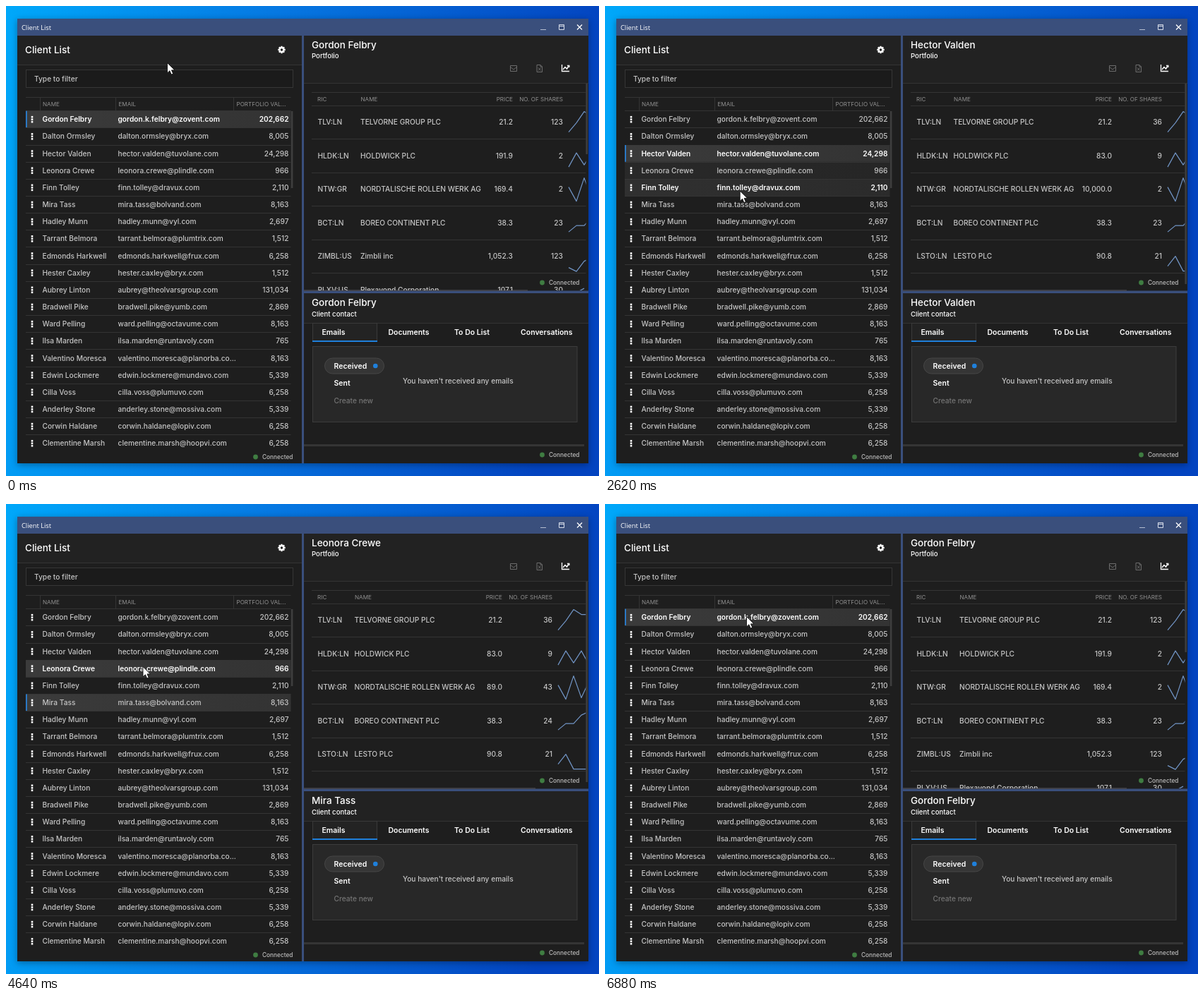
These frames come from a looping animation (840 px wide and 666 px high, 8.33 s). An HTML page:

```html
<!DOCTYPE html>
<html lang="en">
<head>
<meta charset="utf-8">
<title>Client List</title>
<style>
  html, body { margin: 0; width: 100%; height: 100%; overflow: hidden; background: #0a6ad8; }
  svg { display: block; width: 840px; height: 666px; }
  text { font-family: Inter, "Open Sans", sans-serif; font-size: 10.2px; font-weight: 500; fill: #c6c6c6; white-space: pre; }
  .th { font-size: 8.1px; font-weight: 400; fill: #909090; }
  .h1 { font-size: 13.5px; fill: #fff; }
  .h2 { font-size: 9.6px; fill: #fff; }
  .tab { font-size: 10.5px; font-weight: 600; fill: #fff; }
  .small { font-size: 8.3px; fill: #bdbdbd; }
  .caption { font: 9.3px "Open Sans", sans-serif; fill: #fff; }
  .on text { font-weight: 600; fill: #fff; }
  .line { stroke: #343434; stroke-width: 1; fill: none; }
  .spark { stroke: #7195c6; stroke-width: 1.2; fill: none; stroke-linejoin: round; }
</style>
</head>
<body>
<svg id="stage" viewBox="0 0 840 666" xmlns="http://www.w3.org/2000/svg"></svg>
<script>
const LOOP = 8330, FADE = 160, ROW = 24.16, TOP = 148.7;

const clients = [
  ['Gordon Felbry', 'gordon.k.felbry@zovent.com', '202,662'],
  ['Dalton Ormsley', 'dalton.ormsley@bryx.com', '8,005'],
  ['Hector Valden', 'hector.valden@tuvolane.com', '24,298'],
  ['Leonora Crewe', 'leonora.crewe@plindle.com', '966'],
  ['Finn Tolley', 'finn.tolley@dravux.com', '2,110'],
  ['Mira Tass', 'mira.tass@bolvand.com', '8,163'],
  ['Hadley Munn', 'hadley.munn@vyl.com', '2,697'],
  ['Tarrant Belmora', 'tarrant.belmora@plumtrix.com', '1,512'],
  ['Edmonds Harkwell', 'edmonds.harkwell@frux.com', '6,258'],
  ['Hester Caxley', 'hester.caxley@bryx.com', '1,512'],
  ['Aubrey Linton', 'aubrey@theolvarsgroup.com', '131,034'],
  ['Bradwell Pike', 'bradwell.pike@yumb.com', '2,869'],
  ['Ward Pelling', 'ward.pelling@octavume.com', '8,163'],
  ['Ilsa Marden', 'ilsa.marden@runtavoly.com', '765'],
  ['Valentino Moresca', 'valentino.moresca@planorba.co...', '8,163'],
  ['Edwin Lockmere', 'edwin.lockmere@mundavo.com', '5,339'],
  ['Cilla Voss', 'cilla.voss@plumuvo.com', '6,258'],
  ['Anderley Stone', 'anderley.stone@mossiva.com', '5,339'],
  ['Corwin Haldane', 'corwin.haldane@lopiv.com', '6,258'],
  ['Clementine Marsh', 'clementine.marsh@hoopvi.com', '6,258']
];

const rise = [13, 17, 4, 12, 8, -12, -4, -16, -4, -12, -12, -12];
const firms = {
  tlv: ['TLV:LN', 'TELVORNE GROUP PLC', [14, 1, -15, -8, -8]],
  hol: ['HLDK:LN', 'HOLDWICK PLC', [16, -4, 13, -4, 16]],
  ntw: ['NTW:GR', 'NORDTALISCHE ROLLEN WERK AG', [-3, 17, -16, 15, -9]],
  bct: ['BCT:LN', 'BOREO CONTINENT PLC', [13, 4, 4, -8, -13]],
  zim: ['ZIMBL:US', 'Zimbli inc', [16, 21.5, 7, 2]],
  plx: ['PLXV:US', 'Plexavond Corporation', [10, 4, -2]],
  lst: ['LSTO:LN', 'LESTO PLC', [14, 0, 21, 21, 21]],
  hol2: ['HLDK:LN', 'HOLDWICK PLC', [17, -4, 14, -3, 14, 0, 12, -15, 1, 1, -7, -11]],
  asd: ['QVES:US', 'ASD', rise],
  dswe: ['QVES:US', 'DSWE', rise]
};

const miraRows = [['tlv', '21.2', 36], ['hol', '83.0', 9], ['ntw', '89.0', 43], ['bct', '38.3', 24], ['lst', '90.8', 21]];
// name: x of the name column, price: right edge of the price column,
// bar: end of the lower scrollbar, thumb: height of the side scrollbar
const books = [
  { name: 502, price: 718, bar: 739, thumb: 100, rows: [['tlv', '21.2', 123], ['hol', '191.9', 2],
    ['ntw', '169.4', 2], ['bct', '38.3', 23], ['zim', '1,052.3', 123], ['plx', '107.1', 30]] },
  { name: 493.5, price: 718, bar: 739, thumb: 284, rows: [['tlv', '21.2', 36], ['hol', '83.0', 9],
    ['ntw', '10,000.0', 2], ['bct', '38.3', 23], ['lst', '90.8', 21]] },
  { name: 493.5, price: 718, bar: 739, thumb: 284, rows: miraRows },
  { name: 493.5, price: 703, bar: 750, thumb: 284, rows: miraRows },
  { name: 493.5, price: 603, bar: 0, thumb: 0, rows: [['hol2', '5.0', 9], ['asd', '230.3', 2], ['dswe', '230.3', 2]] }
];

// Timeline
const clicks = [[-1e4, 0, 0], [1390, 2, 130], [3110, 5, 70], [4640, 3, 70], [6430, 0, 70]]; // time, row, lag
const phases = [[0, 0, 1], [1520, 1, 0], [1880, 1, 1], [3180, 2, 0], [3510, 2, 1], [3540, 3, 1],
  [4710, 4, 0], [5090, 4, 1], [6500, 0, 0], [6880, 0, 1]]; // time, book, rows loaded
const moves = [[540, 990, 196, 205.5], [2380, 2810, 190, 275.5], [4070, 4280, 194, 230.5], [5700, 6200, 200.5, 159.5]];
const home = [228.5, 80.5];

// Drawing helpers
const text = (x, y, s, cls = '', end) =>
  `<text x="${x}" y="${y}" class="${cls}"${end ? ' text-anchor="end"' : ''}>${s}</text>`;
const rect = (x, y, w, h, fill, more = '') =>
  `<rect x="${x}" y="${y}" width="${w}" height="${h}" fill="${fill}" ${more}/>`;
const path = (d, more = 'class="line"') => `<path d="${d}" ${more}/>`;
const hline = (x1, x2, y) => path(`M${x1} ${y}H${x2}`);
const stroke = (c, w = 1) => `fill="none" stroke="${c}" stroke-width="${w}"`;
const status = (x, y) => `<circle cx="${x}" cy="${y}" r="3.4" fill="#3f7d42"/>` + text(x + 9.5, y + 3, 'Connected', 'small');

function desktop() {
  return `<defs>
    <linearGradient id="sky" x2="1" y2=".12"><stop offset="0" stop-color="#00a8fa"/>
      <stop offset=".45" stop-color="#0678e2"/><stop offset="1" stop-color="#0344c0"/></linearGradient>
    <linearGradient id="pick"><stop offset="0" stop-color="#3b3b3b"/><stop offset="1" stop-color="#333"/></linearGradient>
    <filter id="soft" x="-5%" y="-5%" width="110%" height="110%"><feGaussianBlur stdDeviation="5"/></filter>
    <clipPath id="grid"><rect x="422" y="110" width="399.5" height="293"/></clipPath>
    </defs>` + rect(0, 0, 840, 666, 'url(#sky)') +
    rect(16, 20, 809, 630, '#000', 'opacity=".35" filter="url(#soft)"') + rect(16, 18, 809, 630, '#3a4f7c');
}

function titleBar() {
  return text(22, 33.6, 'Client List', 'caption') +
    path('M757 33.5H765', stroke('#b4bdd0')) +
    path('M783.5 26.5H790.5V33.5H783.5ZM783 28.5H791', stroke('#d8deea')) +
    path('M809 26.5L816 33.5M816 26.5L809 33.5', stroke('#fff', 1.3));
}

function gear(x, y) {
  let teeth = '';
  for (let a = 0; a < 360; a += 45) teeth += rect(-1.2, -5.2, 2.4, 3, '#fff', `transform="rotate(${a})"`);
  return `<g transform="translate(${x} ${y})">${teeth}<circle r="2.8" ${stroke('#fff', 2.2)}/></g>`;
}

function clientRow([name, mail, value], i) {
  const y = TOP + i * ROW, mid = y + 12;
  const dots = [-3.5, 0, 3.5].map(d => rect(35.7, mid + d - 1.3, 2.6, 2.6, '#fff')).join('');
  return `<g class="client">${rect(28, y, 375.5, ROW - .4, 'url(#pick)', 'class="glow"')}` +
    rect(28, y, 1.8, ROW - .4, '#2a7fd4', 'class="mark"') + dots +
    text(51.5, mid + 3.6, name) + text(158.5, mid + 3.6, mail) + text(400.5, mid + 3.6, value, '', true) +
    (i < 19 ? hline(28, 403.5, Math.round(y + ROW - .5) + .5) : '') + '</g>';
}

function clientPanel() {
  return rect(16, 42, 403, 606, '#1e1e1e') + rect(16, 42, 403, 41, '#222') + hline(16, 419, 83.5) +
    text(27, 67, 'Client List', 'h1') + gear(390.5, 62) +
    rect(28.5, 90.5, 378, 25, '#1b1b1b', 'stroke="#363636"') + text(40, 107.2, 'Type to filter') +
    hline(28, 403.5, 129.5) + hline(28, 403.5, 148.5) + path('M48.5 129V148M155.5 129V148M322.5 129V148') +
    text(52, 142, 'NAME', 'th') + text(159.5, 142, 'EMAIL', 'th') + text(326.5, 142, 'PORTFOLIO VAL...', 'th') +
    clients.map(clientRow).join('') +
    rect(403.8, 149, 2.6, 109, '#3e3e3e') + status(353.5, 639);
}

function book({ name, price, bar, thumb, rows }) {
  const shares = price + 71, x0 = price + 79, right = bar ? 822 : 809.5;
  const head = hline(433, right, 122.5) + hline(433, right, 141.5) + text(441, 134.7, 'RIC', 'th') +
    text(name + .5, 134.7, 'NAME', 'th') + text(price, 134.7, 'PRICE', 'th', true) +
    text(shares, 134.7, 'NO. OF SHARES', 'th', true);
  const body = rows.map(([key, cost, count], r) => {
    const mid = 164.6 + r * 47.5, [ric, firm, trend] = firms[key];
    return text(441.5, mid + 3.7, ric) + text(name, mid + 3.7, firm) +
      text(price, mid + 3.7, cost, '', true) + text(shares, mid + 3.7, count, '', true) +
      path('M' + trend.map((d, k) => `${x0 + k * 11} ${mid + d}`).join('L'), 'class="spark"') +
      (rows.length > 3 || r < 2 ? hline(433, right, Math.round(mid + 23.5) + .5) : '');
  }).join('');
  return `<g class="book">${bar ? rect(422, 402.2, bar - 422, 1.6, '#45454c') : ''}<g clip-path="url(#grid)">${head}</g>` +
    `<g class="body"><g clip-path="url(#grid)">${body}</g>${rect(821.4, 110, 2.6, thumb, '#3e3e3e')}</g></g>`;
}

function portfolioPanel() {
  const dim = stroke('#6c6c6c');
  return rect(422, 42, 403, 361.5, '#1e1e1e') + rect(422, 42, 403, 67, '#222') + hline(422, 825, 109.5) +
    text(433, 60, '', 'h1 who') + text(433, 74.2, 'Portfolio', 'h2') +
    path('M714.5 84.5H723.5V92.5H714.5ZM714.5 86.5L719 90L723.5 86.5', dim) +
    path('M752 83.5H757L759.5 86V93.5H752ZM757 83.5V86H759.5M754 87.5L757.5 91.5M757.5 87.5L754 91.5', dim) +
    path('M787.5 83V92.5H798', stroke('#fff', 1.3)) +
    path('M789 90L792 86.5L794.5 89L797.5 84.5M795 84.5H797.7V87', stroke('#fff', 1.5)) +
    books.map(book).join('') + status(759.5, 392);
}

function contactPanel() {
  return rect(422, 407, 403, 241, '#1e1e1e') + rect(422, 407, 403, 42, '#222') +
    text(433, 425.4, '', 'h1 who') + text(433, 439.8, 'Client contact', 'h2') + hline(422, 825, 449.5) +
    rect(434.5, 449.5, 91, 25, '#232323', 'stroke="#3a3a3a"') + rect(434, 474, 92, 2, '#1f80dc') +
    text(447.5, 465.7, 'Emails', 'tab') + text(541.5, 465.7, 'Documents', 'tab') +
    text(635, 465.7, 'To Do List', 'tab') + text(729, 465.7, 'Conversations', 'tab') +
    rect(434.5, 482.5, 374.5, 107, '#282828', 'stroke="#3c3c3c"') +
    rect(451.5, 499, 84, 22, '#353535', 'rx="11" stroke="#464646"') +
    '<circle cx="523.3" cy="510" r="3.3" fill="#1f80dc"/>' +
    text(464.5, 513.6, 'Received', 'tab') + text(464.5, 538.2, 'Sent', 'tab') +
    `<g opacity=".48">${text(464.5, 563, 'Create new')}</g>` +
    text(562, 534.8, "You haven't received any emails") +
    rect(422, 621, 397, 3, '#353535') + status(759.5, 636);
}

const arrow = path('M0 0V14.4L3.4 11.3L5.7 16.6L8.2 15.5L6 10.4H10.5Z',
  'id="arrow" fill="#fff" stroke="#111" stroke-width=".9" stroke-linejoin="round"');

const stage = document.getElementById('stage');
stage.innerHTML = desktop() + titleBar() + clientPanel() + portfolioPanel() + contactPanel() + arrow;

const all = q => [...stage.querySelectorAll(q)];
const rowEls = all('.client'), glows = all('.glow'), marks = all('.mark');
const bookEls = all('.book'), bodies = all('.body'), who = all('.who'), arrowEl = stage.querySelector('#arrow');

// State at a given time
function pointer(t) {
  let [x, y] = home;
  for (const [a, b, tx, ty] of moves) {
    if (t <= a) break;
    const p = Math.min(1, (t - a) / (b - a)), e = 1 - (1 - p) ** 2;
    x += (tx - x) * e;
    y += (ty - y) * e;
  }
  return [x, y];
}
const hovered = t => Math.floor((pointer(t)[1] - TOP) / ROW);
const selected = (t, lag) => clicks.filter(c => c[0] + (lag ? c[2] : 0) <= t).pop()[1];
const show = (el, on) => el.setAttribute('display', on ? 'inline' : 'none');

function draw(t) {
  const hover = hovered(t), pick = selected(t), late = selected(t, true);
  const glow = clients.map(() => 0), n = 16;
  for (let k = 0; k < n; k++) {
    const past = t - FADE * k / n;
    new Set([hovered(past), selected(past, true)]).forEach(i => { if (i >= 0) glow[i] += 1 / n; });
  }
  rowEls.forEach((el, i) => {
    el.setAttribute('class', i === hover || i === pick ? 'client on' : 'client');
    glows[i].setAttribute('opacity', glow[i].toFixed(3));
    marks[i].setAttribute('opacity', i === late ? 1 : 0);
  });
  who[0].textContent = clients[pick][0];
  who[1].textContent = clients[late][0];
  const [, open, loaded] = phases.filter(p => p[0] <= t).pop();
  bookEls.forEach((el, i) => {
    show(el, i === open);
    show(bodies[i], loaded);
  });
  arrowEl.setAttribute('transform', `translate(${pointer(t).map(v => v.toFixed(1)).join(' ')})`);
}

const start = performance.now();
function tick(now) {
  draw(Math.max(0, now - start) % LOOP);
  requestAnimationFrame(tick);
}
draw(0);
requestAnimationFrame(tick);
</script>
</body>
</html>
```
